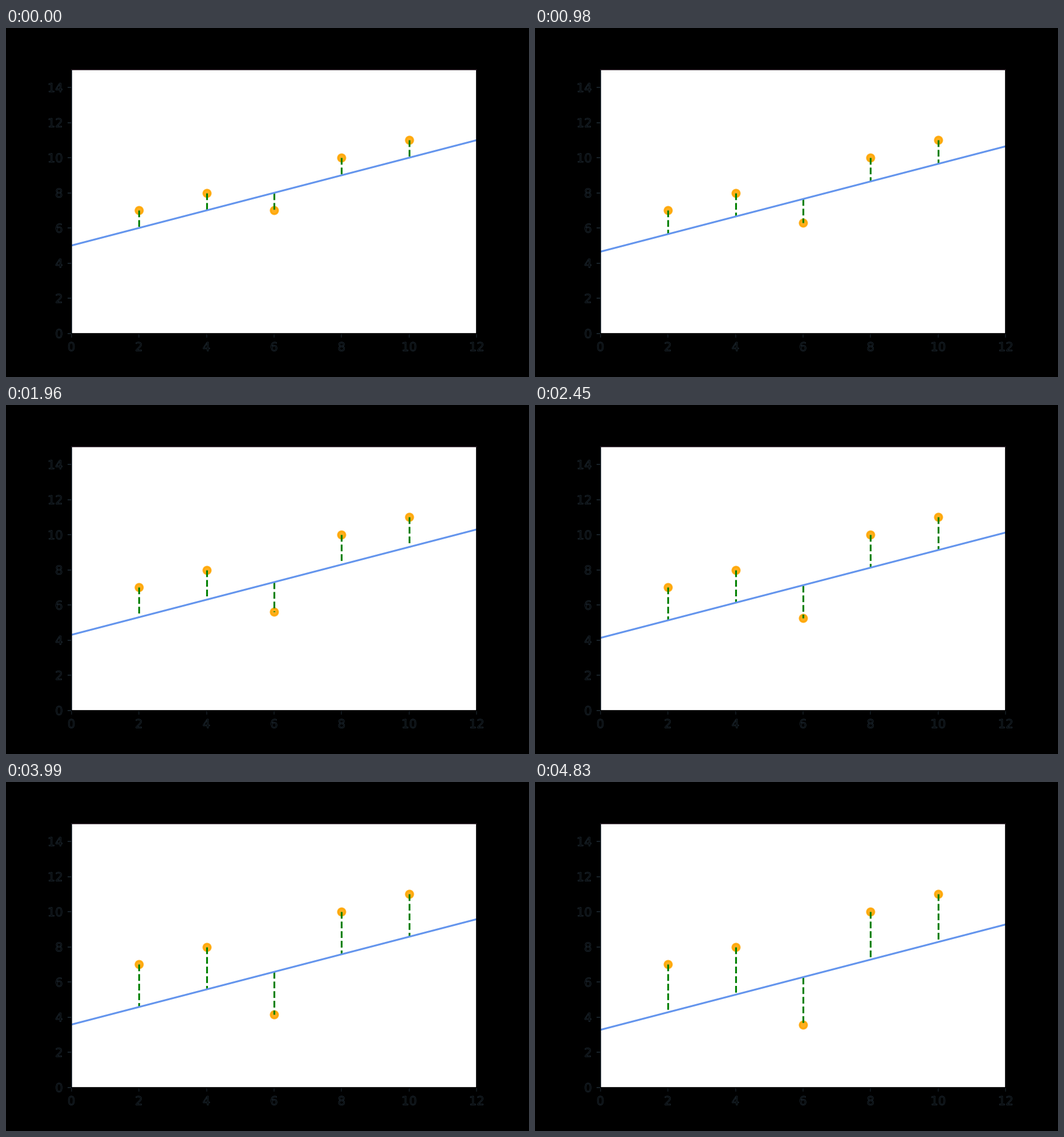
These frames come from a looping animation (917x611 px, 4.9 s). A matplotlib script:

```python
import numpy as np
import matplotlib.pyplot as plt
from matplotlib.animation import FuncAnimation
from matplotlib.patheffects import Normal, Stroke

W, H, DPI = 917, 611, 128
FRAMES, INTERVAL = 70, 70
S = 152.8 / DPI  # scale for point sizes

SLOPE = 0.5
XS = np.arange(2, 11, 2)
YS = np.array([7, 8, 7, 10, 11], float)
MOVING = 2  # index of the sinking point

plt.rcParams["font.family"] = "DejaVu Sans"

fig = plt.figure(figsize=(W / DPI, H / DPI), dpi=DPI, facecolor="black")
ax = fig.add_axes([0.125, 0.125, 0.775, 0.755], facecolor="white")
ax.set(xlim=(0, 12), ylim=(0, 15),
       xticks=range(0, 13, 2), yticks=range(0, 15, 2))


def style_axes():
    tick = dict(length=3.5 * S, width=0.8 * S, pad=3.5 * S,
                labelsize=10 * S, labelcolor="black")
    ax.tick_params(axis="x", color="#141c22", **tick)
    ax.tick_params(axis="y", color="#1e2a32", **tick)
    edges = {"top": "#20141c", "left": "#0c141c",
             "bottom": "black", "right": "black"}
    for side, color in edges.items():
        ax.spines[side].set(color=color, linewidth=0.8 * S)
    # black digits with a faint rim
    rim = [Normal(), Stroke(linewidth=0.42, foreground="#24323d")]
    for label in ax.get_xticklabels() + ax.get_yticklabels():
        label.set_path_effects(rim)


style_axes()

dots = ax.scatter(XS, YS, s=36 * S**2, color="orange", alpha=0.88,
                  linewidths=1.5 * S, zorder=1)
gaps = [ax.plot([], [], "--", color="green", lw=1.5 * S, zorder=1.5)[0]
        for _ in XS]
fit, = ax.plot([], [], color="cornflowerblue", lw=1.5 * S, zorder=2)


def update(i):
    base = 5 - 0.025 * i
    ys = YS.copy()
    ys[MOVING] -= 0.05 * i
    dots.set_offsets(np.column_stack([XS, ys]))
    fit.set_data([0, 12], [base, base + 12 * SLOPE])
    for gap, x, y in zip(gaps, XS, ys):
        on_line = base + SLOPE * x
        gap.set_data([x, x], [max(y, on_line), min(y, on_line)])
    return [dots, fit, *gaps]


anim = FuncAnimation(fig, update, frames=FRAMES, interval=INTERVAL,
                     init_func=lambda: update(0), repeat=True, repeat_delay=0)
plt.show()
```
